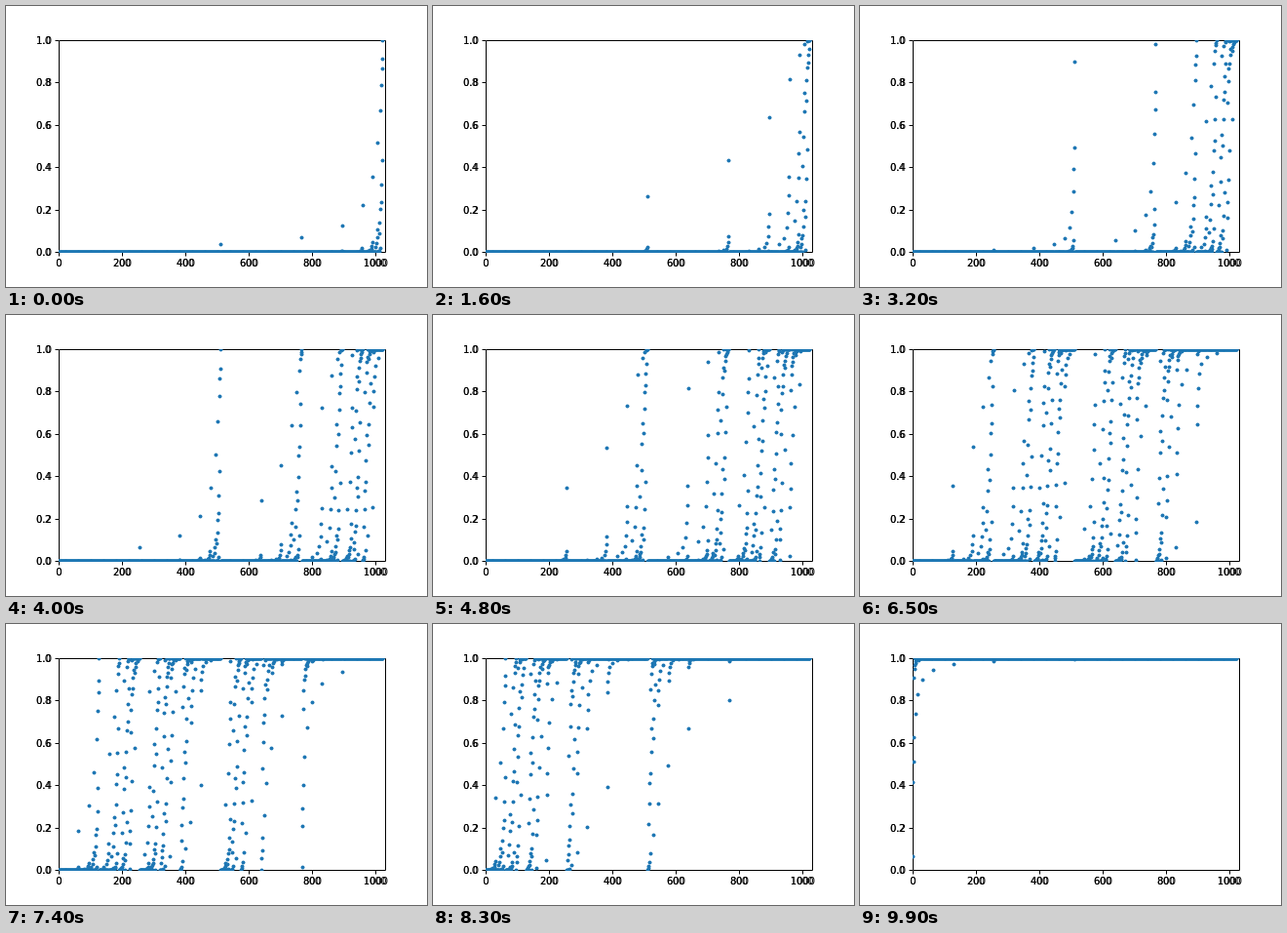
Animation of 432x288 px, one loop 10000 ms. Source, as an HTML page with a canvas:

```html
<!DOCTYPE html>
<html lang="en">
<head>
<meta charset="utf-8">
<title>Channel polarization</title>
<style>
  html, body { margin: 0; width: 100%; height: 100%; overflow: hidden; background: #fff; }
  svg, canvas { position: absolute; left: 0; top: 0; }
  text { font: 10px "DejaVu Sans", sans-serif; }
  .tight { letter-spacing: -.5px; }
</style>
</head>
<body>
<svg id="axes" width="432" height="288"></svg>
<canvas id="dots" width="432" height="288"></canvas>
<script>
const LEFT = 54, BOTTOM = 252, X_UNIT = 0.325, Y_UNIT = 217.44;
const toX = v => Math.round(LEFT + v * X_UNIT) + 0.5;
const toY = v => Math.round(BOTTOM - v * Y_UNIT) + 0.5;

// Axes, ticks and labels; every label is printed twice with different spacing
let path = 'M54.5 35.5H389.5V252.5H54.5Z', labels = '';
function label(x, y, str) {
  for (const style of ['', 'tight'])
    labels += `<text class="${style}" x="${x}" y="${y}">${str}</text>`;
}
for (let k = 0; k <= 5; k++) {
  const x = toX(200 * k), y = toY(k / 5), name = String(200 * k);
  path += `M${x} 253v3.5M54 ${y}h-3.5`;
  label(x - name.length * 3.18, 267, name);
  label(31.1, y + 3.5, (k / 5).toFixed(1));
}
document.getElementById('axes').innerHTML =
  `<path d="${path}" fill="none" stroke="#000"/>${labels}`;

// Density evolution. A channel is a list of weights, one for each reliability
// |LLR| of a fixed grid that is geometric near zero and linear further out.
const X_MIN = -3.5, X_STEP = 0.3, BINS = 87, LEVELS = 10;
const llr = Array.from({ length: BINS }, (_, i) =>
  i ? Math.log1p(Math.exp(X_MIN + (i - 1) * X_STEP)) : 0);
const softBit = llr.map(l => Math.tanh(l / 2));
const spread = l => 1 / Math.cosh(l / 2) ** 2;
const bitCapacity = llr.map(l => {
  const e = Math.exp(-l);
  return 1 - (Math.log1p(e) + l * e / (1 + e)) / Math.LN2;
});

// Lower bin and upper share for a reliability between two bins
function place(l) {
  if (l >= llr[BINS - 1]) return [BINS - 2, 1];
  const x = Math.floor((Math.log(Math.expm1(l)) - X_MIN) / X_STEP) + 1;
  const i = Math.min(Math.max(x, 0), BINS - 2);
  const low = spread(llr[i]), high = spread(llr[i + 1]);
  return [i, (low - spread(l)) / (low - high)];
}

// For each pair of bins: the check node result, the sum and the difference
const bin = [], share = [];
for (let a = 0; a < BINS; a++)
  for (let b = 0; b <= a; b++)
    for (const l of [2 * Math.atanh(softBit[a] * softBit[b]), llr[a] + llr[b], llr[a] - llr[b]]) {
      const [i, f] = place(l);
      bin.push(i);
      share.push(f);
    }

function add(weights, i, f, w) {
  weights[i] += w * (1 - f);
  weights[i + 1] += w * f;
}

function gaussianChannel(snr) {
  const mean = 2 * snr, count = 2000;
  const step = (mean + 8 * Math.sqrt(2 * mean)) / count;
  const weights = new Float64Array(BINS);
  for (let j = 0; j < count; j++) {
    const l = (j + 0.5) * step;
    const density = Math.exp(-((l - mean) ** 2) / (4 * mean)) / Math.sqrt(4 * Math.PI * mean);
    add(weights, ...place(l), step * density * (1 + Math.exp(-l)));
  }
  return weights;
}

function split(w) {
  const minus = new Float64Array(BINS), plus = new Float64Array(BINS);
  for (let a = 0, k = 0; a < BINS; a++)
    for (let b = 0; b <= a; b++, k += 3) {
      const p = w[a] * w[b] * (a === b ? 1 : 2);
      if (p < 1e-16) continue;
      const agree = p * (1 + softBit[a] * softBit[b]) / 2;
      add(minus, bin[k], share[k], p);
      add(plus, bin[k + 1], share[k + 1], agree);
      add(plus, bin[k + 2], share[k + 2], p - agree);
    }
  return [minus, plus];
}

// Capacities of all synthetic channels below w, stopping early where every
// one of them is visibly 0 or 1
function polarize(w, level = LEVELS) {
  const c = w.reduce((sum, v, i) => sum + v * bitCapacity[i], 0);
  if (!level) return [c];
  const size = 2 ** level;
  if (c * size < 0.002) return Array(size).fill(0);
  if ((1 - c) * size < 0.002) return Array(size).fill(1);
  return split(w).flatMap(v => polarize(v, level - 1));
}

// 101 noise levels in steps of 0.3 dB, thinned to 100 pictures
const STEPS = 100, STEP_MS = 100, cache = [];
function capacities(k) {
  const db = -20 + 0.3 * Math.floor(k * STEPS / (STEPS - 1));
  return cache[k] ??= polarize(gaussianChannel(10 ** (db / 10)));
}

// Scatter plot
const ctx = document.getElementById('dots').getContext('2d');
ctx.beginPath();
ctx.rect(54, 35, 336, 218);
ctx.clip();
ctx.fillStyle = '#1f77b4';

let shown = -1;
const start = performance.now();

function draw(now) {
  const k = Math.floor(Math.max(0, now - start) / STEP_MS) % STEPS;
  if (k !== shown) {
    shown = k;
    ctx.clearRect(0, 0, 432, 288);
    capacities(k).forEach((c, i) => {
      ctx.beginPath();
      ctx.arc(toX(i), toY(c), 2, 0, 2 * Math.PI);
      ctx.fill();
    });
    capacities((k + 1) % STEPS); // prepare the next picture
  }
  requestAnimationFrame(draw);
}
draw(start);
</script>
</body>
</html>
```
